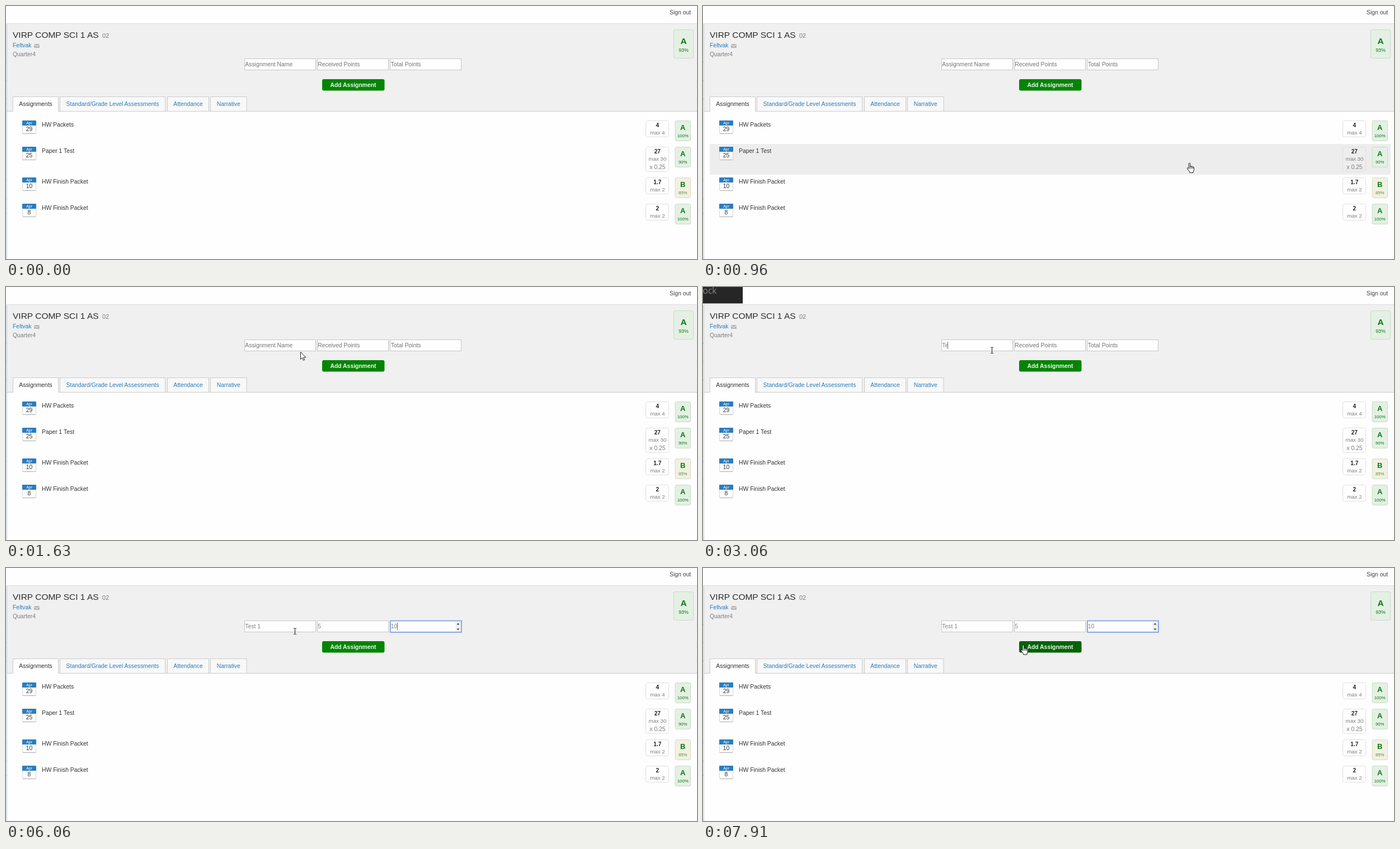
Recreate the animation shown at these times as an HTML page. Size 1235 px wide and 453 px high, loop 8 s.

```html
<!DOCTYPE html>
<html lang="en">
<head>
<meta charset="utf-8">
<title>Grade page</title>
<style>
  html, body { margin: 0; width: 100%; height: 100%; overflow: hidden; background: #fefefe; }
  svg { display: block; width: 100%; height: 100%; }
  text { font: 10.4px "Liberation Sans", Arial, sans-serif; white-space: pre; }
</style>
</head>
<body>
<svg id="stage" viewBox="0 0 1235 453"></svg>
<script>
const LOOP = 8000, BLINK = 530;
const INK = '#333', GRAY = '#7d7d7d', LINK = '#2a7cbf', GREEN = '#08790f', LINE = '#cbcbcb';
const stage = document.getElementById('stage');

function add(tag, attrs, parent = stage) {
  const el = document.createElementNS('http://www.w3.org/2000/svg', tag);
  for (const name in attrs) el.setAttribute(name, attrs[name]);
  return parent.appendChild(el);
}
const rect = (x, y, width, height, fill, more) => add('rect', { x, y, width, height, fill, ...more });
const path = (d, attrs, parent) => add('path', { d, fill: 'none', ...attrs }, parent);
function text(x, y, str, fill, { size, bold, mid, font } = {}) {
  const el = add('text', { x, y, fill, 'text-anchor': mid ? 'middle' : 'start' });
  el.textContent = str;
  if (size) el.style.fontSize = size + 'px';
  if (bold) el.style.fontWeight = 'bold';
  if (font) el.style.fontFamily = font;
  return el;
}
const show = (el, on) => el.setAttribute('visibility', on ? 'visible' : 'hidden');

// Header
rect(0, 0, 1235, 453, '#fefefe');
rect(1, 31, 1234, 158, '#f0f0f0');
rect(1, 31, 1234, 1, '#dcdcdc');
rect(1, 188, 1234, 1, LINE);
rect(0, 32, 1, 421, '#eef3f8');
rect(1, 32, 1, 421, '#c9ced6');
for (const y of [100, 133, 166, 312, 345, 371]) rect(0, y, 1, 1, '#9fc0dd');
text(1186, 15, 'Sign out', '#444');
text(12, 57, 'VIRP COMP SCI 1 AS', '#2c2c2c', { size: 15.5 });
text(172, 57, '02', GRAY, { size: 10.8 });
text(12, 74, 'Feltvak', LINK);
rect(50, 68, 10, 7, '#b9b9b9', { rx: 1 });
path('M50 69l5 3.5l5-3.5', { stroke: '#f0f0f0' });
text(12, 90, 'Quarter4', GRAY);

function gradeBox(x, y, w, h, letter, percent, big) {
  const isB = letter === 'B', cx = x + w / 2;
  rect(x + .5, y + .5, w - 1, h - 1, isB ? '#f0f0e3' : '#e4f0e4', { rx: 2.5, stroke: isB ? '#dcdac6' : '#c8dcc8' });
  text(cx, y + (big ? 26 : 17), letter, GREEN, { size: big ? 15.5 : 13, bold: true, mid: true });
  text(cx, y + (big ? 40 : 30), percent, isB ? '#5b8f36' : GREEN, { size: big ? 8.8 : 7.8, mid: true });
}
gradeBox(1193, 42, 36, 52, 'A', '93%', true);

// Form
const fields = [
  { x: 427, hint: 'Assignment Name', focus: 2340, blur: 4220,
    keys: [[2790, 'T'], [3060, 'e'], [3200, 's'], [3370, 't'], [3510, ' '], [3900, '1']] },
  { x: 557, hint: 'Received Points', focus: 4220, blur: 5480, ring: true, keys: [[5060, '5']] },
  { x: 687.5, hint: 'Total Points', focus: 5480, blur: LOOP, ring: true, keys: [[5690, '1'], [5910, '0']] },
];
for (const f of fields) {
  const left = Math.floor(f.x);
  rect(left - .5, 94.5, 127, 20, '#fefefe', { stroke: '#c6c6c6' });
  f.label = text(f.x + .3, 108.3, f.hint, '#757575');
  f.caret = rect(0, 98, 1, 13, '#777');
  f.active = add('g', {});
  add('rect', { x: left, y: 94.5, width: 127, height: 20.5, fill: 'none', stroke: '#7ba0e8', 'stroke-width': 1.7 }, f.active);
  add('rect', { x: left + 116, y: 96, width: 10, height: 17.5, fill: '#f1f1f1' }, f.active);
  path(`M${left + 118.5} 101.5h5l-2.5-3zM${left + 118.5} 108.5h5l-2.5 3z`, { fill: '#444' }, f.active);
}
const button = rect(565, 131, 111.5, 20.5, '#048404', { rx: 3 });
text(620.5, 145.2, 'Add Assignment', '#eaf5ea', { bold: true, mid: true });

// Tabs
[[12, 82, 'Assignments'], [96, 189, 'Standard/Grade Level Assessments'],
 [288, 75, 'Attendance'], [365, 65.5, 'Narrative']].forEach(([x, w, label], i) => {
  rect(x + .5, 162.5, w - 1, 26, i ? '#f8f8f8' : '#fefefe', { stroke: LINE });
  if (!i) rect(x + 1, 187, w - 2, 3, '#fefefe');
  text(x + w / 2, 179.4, label, i ? LINK : INK, { mid: true });
});

// Assignment rows
const rows = [
  { top: 200, day: 29, name: 'HW Packets', score: '4', max: 'max 4', grade: 'A', percent: '100%' },
  { top: 247, day: 25, name: 'Paper 1 Test', score: '27', max: 'max 30', weight: 'x 0.25', grade: 'A', percent: '90%' },
  { top: 302, day: 10, name: 'HW Finish Packet', score: '1.7', max: 'max 2', grade: 'B', percent: '85%' },
  { top: 349, day: 8, name: 'HW Finish Packet', score: '2', max: 'max 2', grade: 'A', percent: '100%' },
];
for (const r of rows) {
  const y = r.top + 5;
  r.bottom = r.top + (r.weight ? 55 : 47);
  r.glow = rect(12, r.top, 1217, r.bottom - r.top, '#ededed');
  rect(29.5, y + .5, 24, 23, '#fefefe', { rx: 1.5, stroke: '#d6d6d6' });
  rect(30, y + 23, 23, 1, '#aaa');
  rect(29, y, 25, 9, LINK, { rx: 1 });
  text(41.5, y + 6.7, 'Apr', '#fff', { size: 6.8, mid: true });
  text(41.5, y + 19, r.day, INK, { mid: true });
  text(64, y + 11, r.name, INK);
  rect(1143.5, y + .5, 41, r.weight ? 44 : 29, 'none', { rx: 3, stroke: '#e0e0e0' });
  text(1164.3, y + 12, r.score, '#222', { size: 10, bold: true, mid: true });
  text(1164.5, y + 25.2, r.max, GRAY, { size: 9.7, mid: true });
  if (r.weight) text(1164.5, y + 40, r.weight, GRAY, { mid: true });
  gradeBox(1195.5, y, 28.5, 37, r.grade, r.percent);
}

// Keyboard notice: [time, opacity]
const notice = [[0, 0], [2730, .85], [2790, 1], [3060, .85], [3130, .94], [3200, 1], [5690, .85], [6060, 0]];
const noticeBox = rect(0, 0, 71, 29.5, '#000');
const noticeText = text(-.5, 12, 'ock', '#fff', { size: 15.6, font: '"Open Sans", sans-serif' });

// Pointers, each with its hot spot at 0,0
const outline = { fill: '#fff', stroke: '#111', 'stroke-linejoin': 'round' };
const pointers = {
  arrow: path('M.5 .5V13.5L3.5 10.7L5.5 15.3L7.6 14.4L5.6 10H9.8Z', { ...outline, 'stroke-width': .9 }),
  hand: path('M-1.3 10.5V1.8a1.3 1.3 0 0 1 2.6 0V7q.2-1.2 1.3-1.1t1.2 1.4q.3-1.1 1.2-.9t1.1 1.5' +
    'q.3-.9 1.1-.6t.8 1.5V12q0 2-1.3 3.5V17.5H.3V16L-3.8 10.8q-.8-1.9.6-2q.9 0 1.9 1.7z' +
    'M1.3 7v3.5M3.8 7.3v3.2M6.1 7.9v2.6', outline),
  beam: path('M-2.5-5H-.8L0-4.3L.8-5H2.5M0-4.3V4.8M-2.5 5.5H-.8L0 4.8L.8 5.5H2.5', { stroke: '#111' }),
};

// Pointer moves in even hops: [first hop, last hop, hops, x, y]
const moves = [
  [190, 750, 8, 918, 303.5], [960, 1160, 4, 724, 212.5], [1390, 1630, 4, 526, 116],
  [1810, 1930, 3, 520.5, 115], [2180, 2340, 3, 516.5, 113], [6460, 7160, 10, 555, 135],
  [7270, 7750, 7, 573, 141], [7910, 7910, 1, 572.3, 137.5],
];
function pointerAt(t) {
  let x = 1150, y = 454;
  for (const [from, to, hops, toX, toY] of moves) {
    if (t < from) break;
    const gap = (to - from) / (hops - 1) || 1;
    const part = Math.min(hops, Math.floor((t - from) / gap + 1e-6) + 1) / hops;
    x += (toX - x) * part;
    y += (toY - y) * part;
  }
  return { x, y };
}

function drawField(f, t) {
  const typed = f.keys.filter(k => k[0] <= t);
  const value = typed.map(k => k[1]).join('');
  f.label.textContent = value || f.hint;
  f.label.setAttribute('fill', value ? '#858585' : '#757575');
  const focused = t >= f.focus && t < f.blur;
  const since = t - (typed.length ? typed[typed.length - 1][0] : f.focus);
  show(f.active, focused && f.ring);
  show(f.caret, focused && Math.floor(since / BLINK) % 2 === 0);
  f.caret.setAttribute('x', Math.floor(f.x + (value ? f.label.getComputedTextLength() : .5)));
}

function draw(t) {
  const { x, y } = pointerAt(t);
  let overRow = false;
  for (const r of rows) {
    const over = y >= r.top && y < r.bottom;
    show(r.glow, over);
    overRow = overRow || over;
  }
  const overButton = x >= 565 && x < 677 && y >= 131 && y < 152;
  const overField = y > 93 && y < 116 && fields.some(f => x >= f.x && x < f.x + 127);
  const kind = overRow || overButton ? 'hand' : overField ? 'beam' : 'arrow';
  for (const name in pointers) show(pointers[name], name === kind);
  pointers[kind].setAttribute('transform', `translate(${x} ${y})`);
  button.setAttribute('fill', overButton ? '#046304' : '#048404');

  fields.forEach(f => drawField(f, t));
  const alpha = notice.filter(n => n[0] <= t).pop()[1];
  noticeBox.setAttribute('opacity', alpha);
  noticeText.setAttribute('opacity', Math.max(0, alpha * 3.7 - 2.7));
}

const start = performance.now();
function tick() {
  draw((performance.now() - start) % LOOP);
  requestAnimationFrame(tick);
}
tick();
</script>
</body>
</html>
```
